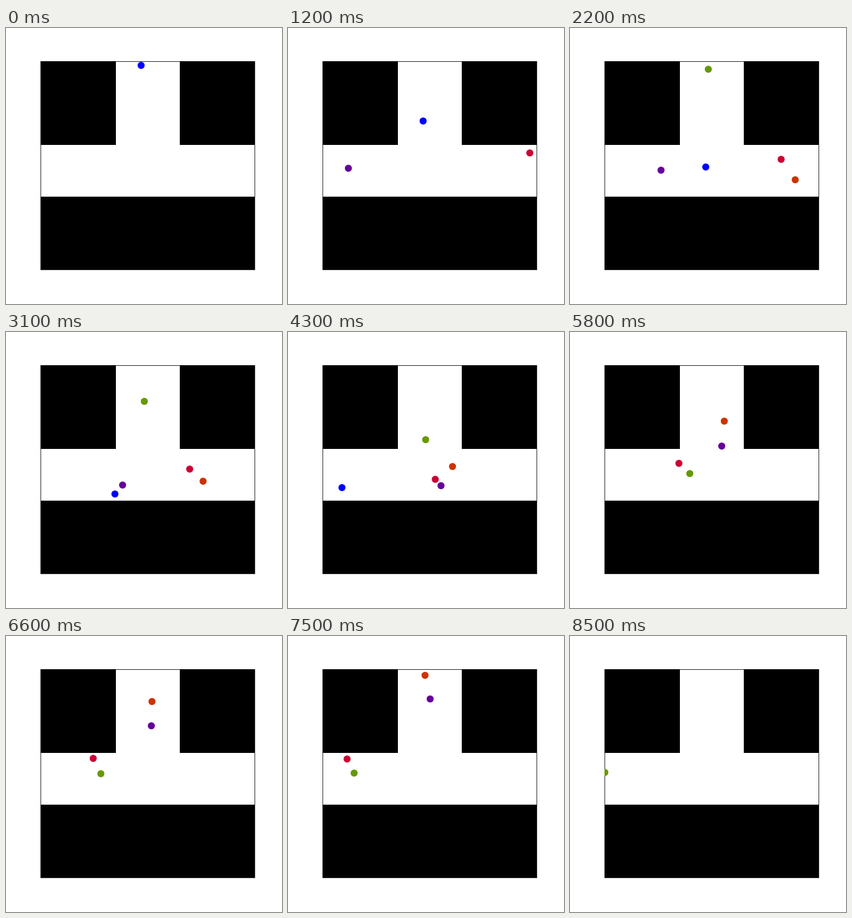
An HTML page for the animation above (8.6 s loop, 432 by 432 pixels).

```html
<!DOCTYPE html>
<html lang="en">
<head>
<meta charset="utf-8">
<title>Agents crossing a T-junction</title>
<style>
html, body { margin: 0; width: 100%; height: 100%; overflow: hidden; background: #fff; }
svg { display: block; }
</style>
</head>
<body>
<svg width="432" height="432" viewBox="0 0 432 432">
  <clipPath id="room"><rect x="54" y="52" width="336" height="327"/></clipPath>
  <path d="M54 52h118v131H54zM272 52h117v131H272zM54 264h335v114H54z"/>
  <rect x="54.5" y="52.5" width="335" height="326" fill="none" stroke="#000" stroke-opacity=".8"/>
  <g id="agents" clip-path="url(#room)"></g>
</svg>
<script>
const STEP = 100, STEPS = 86;

// Each agent walks its route at a constant pace from its first to its last step.
const agents = [
  { color: '#0000ff', first: 0, last: 46, route: 'M211 58 L211 216 216 228 205 239 172 253 157 254 62 240' },
  { color: '#660099', first: 5, last: 83, route: 'M60 217 L143 222 182 239 240 240 252 234 247 211 227 141 222 112 223 59' },
  { color: '#cc0033', first: 10, last: 82, route: 'M388 193 L286 214 230 230 212 239 198 229 152 190 57 193' },
  { color: '#cc3300', first: 15, last: 76, route: 'M386 242 L352 237 282 231 257 210 252 171 228 101 212 56' },
  { color: '#669900', first: 20, last: 85, route: 'M216 54 L215 205 208 219 195 222 151 215 54 213' }
];

function svgElement(name, attributes) {
  const element = document.createElementNS('http://www.w3.org/2000/svg', name);
  for (const key in attributes) element.setAttribute(key, attributes[key]);
  return element;
}

for (const agent of agents) {
  agent.path = svgElement('path', { d: agent.route });
  agent.length = agent.path.getTotalLength();
  agent.dot = svgElement('circle', { r: 5.5, fill: agent.color });
  document.getElementById('agents').append(agent.dot);
}

function place({ first, last, path, length, dot }, step) {
  const progress = (step - first) / (last - first);
  const present = progress >= 0 && progress <= 1;
  dot.setAttribute('visibility', present ? 'visible' : 'hidden');
  if (!present) return;
  const point = path.getPointAtLength(progress * length);
  // Dots sit on pixel centres.
  dot.setAttribute('cx', Math.round(point.x) + 0.5);
  dot.setAttribute('cy', Math.round(point.y) + 0.5);
}

const start = performance.now();
function tick() {
  const step = Math.floor((performance.now() - start) / STEP) % STEPS;
  agents.forEach(agent => place(agent, step));
  requestAnimationFrame(tick);
}
tick();
</script>
</body>
</html>
```
